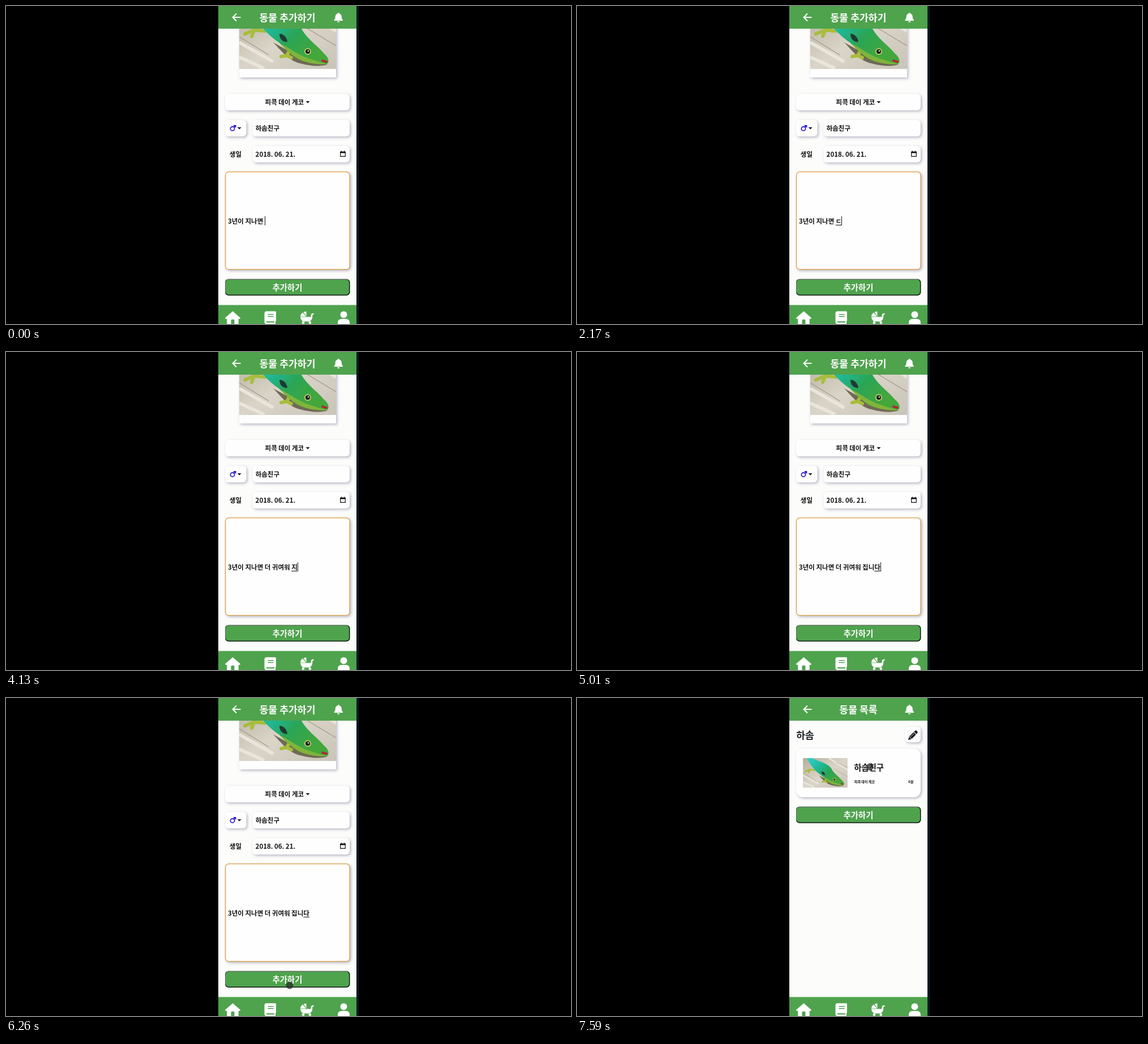
These frames come from a looping animation (998 by 561 pixels, 7.63 s). An HTML page:

```html
<!DOCTYPE html>
<html lang="ko">
<head>
<meta charset="utf-8">
<title>동물 추가하기</title>
<style>
html, body { margin: 0; width: 100%; height: 100%; overflow: hidden; background: #000; }
#stage { position: relative; width: 998px; height: 561px; overflow: hidden; word-spacing: -.06em;
  font: 700 11.5px "Noto Sans CJK KR", "Noto Sans CJK JP", "Noto Sans CJK", sans-serif; }
svg { position: absolute; left: 0; top: 0; display: block; }
text { fill: #111; white-space: pre; }
.mid { text-anchor: middle; }
.title { font-size: 17.2px; fill: #fff; }
.head { font-size: 17.2px; fill: #212529; }
.big { font-size: 14.3px; }
.small { font-size: 6.2px; }
.white { fill: #fff; }
.green { fill: #4fa34d; }
.box { fill: #fefefe; filter: drop-shadow(2px 2px 2.5px rgba(60, 55, 95, .36)); }
#note { position: absolute; left: 392px; top: 370.5px; height: 16px; line-height: 16px;
  white-space: pre; color: #111; }
#note u { text-decoration: underline 1px; text-underline-offset: 2px; text-decoration-skip-ink: none; }
#caret { position: absolute; left: 100%; top: .5px; width: 1px; height: 16px; background: #111; }
#top { pointer-events: none; }
</style>
</head>
<body>
<div id="stage">
<svg width="998" height="561" viewBox="0 0 998 561">
  <defs>
    <linearGradient id="wood" x2="1" y2="1">
      <stop stop-color="#b5ad9a"/><stop offset=".5" stop-color="#dad5c8"/><stop offset="1" stop-color="#c9c4b8"/>
    </linearGradient>
    <linearGradient id="skin" gradientUnits="userSpaceOnUse" x1="20" y1="0" x2="120" y2="100">
      <stop stop-color="#35cfd0"/><stop offset=".4" stop-color="#1fb796"/>
      <stop offset=".65" stop-color="#2aa556"/><stop offset="1" stop-color="#43a73c"/>
    </linearGradient>
    <symbol id="photo" viewBox="0 0 171 113">
      <path fill="url(#wood)" d="M0 0H171V113H0Z"/>
      <path fill="none" stroke="#e9e5db" stroke-width="6" d="M0 66L60 100M100 0L171 46M0 92L44 112"/>
      <path fill="none" stroke="#a29a8a" stroke-width="1.3" d="M0 56L52 88M118 40L171 72M128 16L171 36"/>
      <path fill="#6f6a55" d="M60 66C76 82 86 98 108 103C126 108 144 109 156 105L100 88Z"/>
      <path fill="none" stroke="#a8bd3c" stroke-width="6" stroke-linecap="round" stroke-linejoin="round"
        d="M46 46L26 44L10 51M26 45L22 55M90 78L84 89L74 91M84 89L92 93"/>
      <path fill="url(#skin)" d="M14 0H34C60 12 94 20 108 38C117 58 139 72 149 85C158 92 160 101 155 104C140 106 118 102 104 95C90 87 82 77 70 66C52 54 32 34 14 0Z"/>
      <path fill="#7fb53a" d="M72 68C82 78 90 87 104 95C118 102 140 106 155 104C140 100 118 94 104 86C91 79 84 73 72 68Z"/>
      <path fill="#1e3a34" d="M71 51C78 50 84 57 85 65C77 66 71 60 71 51Z"/>
      <path fill="none" stroke="#b42638" stroke-width="4" stroke-linecap="round" d="M147 98L154 100"/>
      <circle cx="121" cy="82" r="6" fill="#bdc763"/><circle cx="121" cy="82" r="4" fill="#14201a"/>
      <circle cx="122" cy="81" r="1.2" fill="#e6eed0"/>
    </symbol>
    <g id="button">
      <rect x="387" width="220.5" height="29" rx="6" fill="#0c180c"/>
      <path d="M387.6 24V6Q387.6 .6 393 .6H602" fill="none" stroke="#5f6b62" stroke-width="1.2"/>
      <rect class="green" x="388" y="1" width="218" height="26.6" rx="5"/>
      <text class="big mid white" x="497" y="20.2">추가하기</text>
    </g>
    <path id="drop" d="M0 0H7L3.5 3.6Z" fill="#111"/>
  </defs>

  <path fill="#101a24" d="M619 0h4v561h-4z"/>
  <path fill="#fcfcfb" d="M375 0h244v561H375z"/>

  <g id="form">
    <rect class="box" x="412" y="20" width="171" height="106"/>
    <use href="#photo" x="412" y="-1.7" width="171" height="113"/>
    <rect class="box" x="387" y="155" width="220" height="29" rx="6"/>
    <text x="457.6" y="173.9">피콕 데이 게코</text>
    <use href="#drop" x="529.5" y="168"/>
    <rect class="box" x="387" y="201" width="37.5" height="29" rx="6"/>
    <g fill="none" stroke="#2412d8" stroke-width="1.7">
      <circle cx="400" cy="216.4" r="3.6"/><path d="M402.7 213.7L405.4 211M401.8 210.9H405.5V214.6"/>
    </g>
    <use href="#drop" x="408.7" y="214"/>
    <rect class="box" x="435.5" y="201" width="171.5" height="29" rx="6"/>
    <text x="440.7" y="219.9">하솜친구</text>
    <text x="394.8" y="265.7" fill="#212529">생일</text>
    <rect class="box" x="435.5" y="247" width="171.5" height="29" rx="6"/>
    <text x="440.6" y="265.7">2018. 06. 21.</text>
    <path d="M590.7 257.4H599.3V265.4H590.7Z" fill="none" stroke="#111" stroke-width="1.2"/>
    <path d="M590.2 257h9.6v2.6h-9.6zM591.8 255.6h1.4v2h-1.4zM596.8 255.6h1.4v2h-1.4z" fill="#111"/>
    <rect class="box" x="387.6" y="292.6" width="219.4" height="172" rx="6" stroke="#dda043" stroke-width="1.3"/>
    <use href="#button" y="481.7"/>
  </g>

  <g id="list">
    <text class="head" x="387.3" y="72.3">하솜</text>
    <rect class="box" x="579.5" y="51" width="27.5" height="27" rx="6"/>
    <g transform="translate(585 74) rotate(-45)" fill="#151515">
      <path d="M0 0L5.2 -3V3ZM6 -3H16.4V3H6ZM17.6 -3H19.6Q22 -3 22 -.8V.8Q22 3 19.6 3H17.6Z"/>
      <path d="M7 -1H15.5" stroke="#fff" stroke-width=".8"/>
    </g>
    <rect class="box" x="387" y="89" width="220" height="86" rx="12"/>
    <use href="#photo" x="399" y="106" width="79" height="52"/>
    <text class="big" x="489.4" y="128">하솜친구</text>
    <text class="small" x="489.7" y="150.4">피콕 데이 게코</text>
    <text class="small" x="585.2" y="150.4">6살</text>
    <use href="#button" y="191.7"/>
  </g>

  <path class="green" d="M375 0h244v40H375zM375 527.5h244V561H375z"/>
  <path d="M414.5 20H401M407 13.6L400.6 20L407 26.4" fill="none" stroke="#fff" stroke-width="2.1"/>
  <text class="title mid" id="title" x="497" y="27.3"></text>
  <g class="white">
    <path d="M586 13.2Q586 11.8 587.3 11.8T588.5 13.2C591.7 13.9 592.8 16.3 592.8 19C592.8 22 593.6 23 595 24.4Q595.2 26 594 26H580.5Q579.3 26 579.5 24.4C581 23 581.7 22 581.7 19C581.7 16.3 582.8 13.9 586 13.2ZM585 27H589.5Q589 29 587.2 29T585 27Z"/>
    <path d="M400.5 538.5L414 550.2Q414 552 412.3 552H410.7V561H403.5V554.5Q403.5 553 402 553H399Q397.5 553 397.5 554.5V561H390.3V552H388.7Q387 552 387 550.2Z"/>
    <path d="M460.5 538.5H475.5Q477 538.5 477 540V554.5Q477 556 476 556V561H460.5Q456.5 561 456.5 557V542.5Q456.5 538.5 460.5 538.5Z"/>
    <path d="M520 548.6H538.5V545.8Q538.5 542 543.5 542V544.2Q541.2 544.2 541.2 546V548.6Q541.2 554 536 556.6H525.2Q520 554 520 548.6ZM520 547.8Q520.2 543.3 524 540.7L530 547.8ZM525.5 540Q528 539 530.5 539V547.2Z"/>
    <circle cx="525" cy="558.6" r="2.3"/><circle cx="536.8" cy="558.6" r="2.3"/>
    <circle cx="596.5" cy="544.4" r="6"/>
    <path d="M586 561V559Q586 552 593 552H600Q607 552 607 559V561Z"/>
  </g>
  <path d="M462.5 544.2H472.7M462.5 547.8H472.7" stroke="#4fa34d" stroke-width="1.4"/>
  <path d="M460.3 556.2H474V558.5H460.3Q459 557.3 460.3 556.2Z" fill="#4fa34d"/>
</svg>
<div id="note"><span></span><u></u><i id="caret"></i></div>
<svg id="top" width="998" height="561"><circle id="touch" r="6" fill="rgba(42,42,42,.72)" stroke="rgba(20,20,20,.5)"/></svg>
</div>

<script>
const LOOP = 7630, LIST_AT = 6700, BLINK = 500;
const START = "3년이 지나면 ";

// [time, finished text, syllable being composed]
const typing = [
  [0, "", ""], [250, "", "ㄱ"], [400, "", "구"], [500, "", "귀"],
  [750, "귀", "ㅇ"], [950, "귀", "여"], [1250, "귀여", "ㅇ"], [1400, "귀여", "우"],
  [1550, "귀여", ""], [1700, "귀", ""], [1850, "", ""],
  [2100, "", "ㄷ"], [2350, "", "더"], [2600, "더 ", ""],
  [2750, "더 ", "ㄱ"], [2850, "더 ", "구"], [2950, "더 ", "귀"],
  [3100, "더 귀", "ㅇ"], [3200, "더 귀", "여"],
  [3350, "더 귀여", "ㅇ"], [3450, "더 귀여", "우"], [3550, "더 귀여", "워"],
  [3750, "더 귀여워 ", ""], [3950, "더 귀여워 ", "ㅈ"], [4080, "더 귀여워 ", "지"],
  [4250, "더 귀여워 ", "집"], [4380, "더 귀여워 집", "ㄴ"], [4480, "더 귀여워 집", "니"],
  [4600, "더 귀여워 집니", "ㄷ"], [4700, "더 귀여워 집니", "다"]
];

// [time, x, y]
const path = [[5700, 612, 468], [6200, 501, 507], [6850, 501, 507], [7500, 517.5, 121.5], [LOOP, 517.5, 121.5]];

const $ = s => document.querySelector(s);
const form = $("#form"), list = $("#list"), note = $("#note"), touch = $("#touch");
const done = $("#note span"), composing = $("#note u"), caret = $("#caret"), title = $("#title");
const show = (el, on) => { el.style.display = on ? "" : "none"; };
const ease = k => k * k * (3 - 2 * k);

function moveTouch(t) {
  const i = path.findIndex(p => p[0] > t);
  show(touch, i > 0);
  if (i < 1) return;
  const [a, b] = [path[i - 1], path[i]];
  const k = ease((t - a[0]) / (b[0] - a[0]));
  touch.setAttribute("cx", a[1] + (b[1] - a[1]) * k);
  touch.setAttribute("cy", a[2] + (b[2] - a[2]) * k);
}

function draw(t) {
  const isList = t >= LIST_AT;
  show(form, !isList);
  show(note, !isList);
  show(list, isList);
  title.textContent = isList ? "동물 목록" : "동물 추가하기";

  const [since, text, part] = typing.filter(s => s[0] <= t).pop();
  done.textContent = START + text;
  composing.textContent = part;
  show(caret, Math.floor((t - since) / BLINK) % 2 === 0);
  moveTouch(t);
}

const begin = performance.now();
function tick() {
  draw((performance.now() - begin) % LOOP);
  requestAnimationFrame(tick);
}
tick();
</script>
</body>
</html>
```
